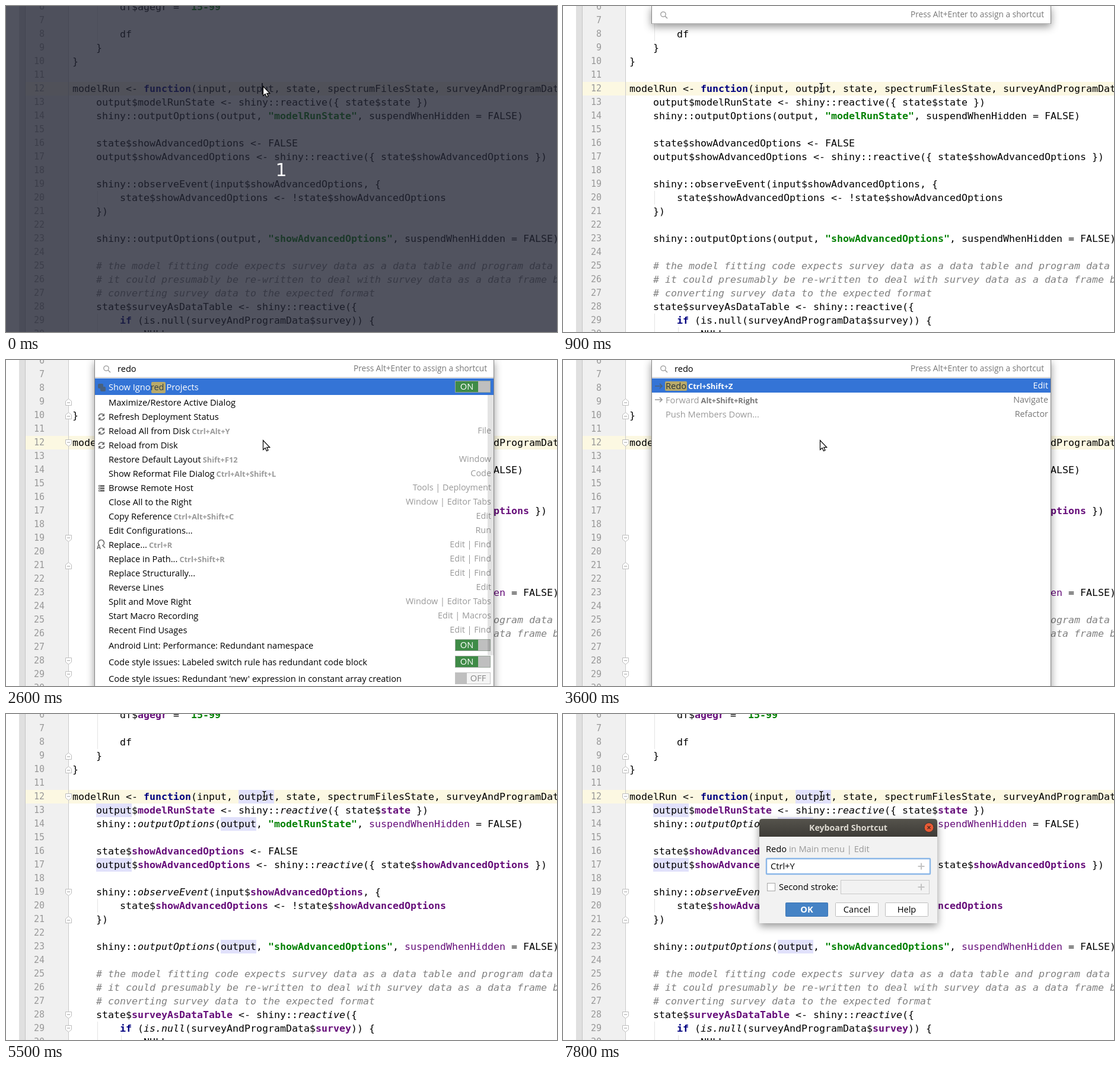
Animation of 929x550 px, one loop 8000 ms. Source, as an HTML page:

```html
<!DOCTYPE html>
<html lang="en">
<head>
<meta charset="utf-8">
<title>Assigning a shortcut</title>
<style>
html, body { margin: 0; width: 929px; height: 550px; overflow: hidden; background: #fff; }
svg { display: block; }
text { white-space: pre; font: 14.65px "Open Sans", "Noto Sans", sans-serif; }
.code text { font: 16.61px "DejaVu Sans Mono", monospace; }
.code .number { font-size: 15px; fill: #999; text-anchor: end; }
.keyword { fill: #000080; font-weight: bold; }
.string { fill: #008000; font-weight: bold; }
.comment { fill: #808080; font-style: italic; }
.semantic .field { fill: #660e7a; font-weight: bold; }
.semantic .call { font-style: italic; }
.semantic .arg { fill: #660e7a; }
.uses { fill: #e1e1fb; }
.keys { font-size: 12.8px; font-weight: bold; fill: #999; }
.place { font-size: 14.4px; fill: #999; text-anchor: end; }
.middle { text-anchor: middle; }
.icon { fill: none; stroke: #6e6e6e; stroke-width: 1.7; }
</style>
</head>
<body>
<svg id="stage" width="929" height="550" viewBox="0 0 929 550">
  <defs>
    <filter id="shadow" filterUnits="userSpaceOnUse" x="100" y="-60" width="780" height="680">
      <feDropShadow dx="0" dy="5" stdDeviation="7" flood-color="#000" flood-opacity=".42"/>
    </filter>
    <linearGradient id="titlebar" x2="0" y2="1">
      <stop stop-color="#55534c"/><stop offset="1" stop-color="#3d3b37"/>
    </linearGradient>
  </defs>
</svg>
<script>
const LOOP = 8000, FIRST_LINE = 6, LINE_HEIGHT = 23;
const stage = document.getElementById('stage');

const source = `        df$agegr = "15-99"

        df
    }
}

modelRun <- function(input, output, state, spectrumFilesState, surveyAndProgramData) {
    output$modelRunState <- shiny::reactive({ state$state })
    shiny::outputOptions(output, "modelRunState", suspendWhenHidden = FALSE)

    state$showAdvancedOptions <- FALSE
    output$showAdvancedOptions <- shiny::reactive({ state$showAdvancedOptions })

    shiny::observeEvent(input$showAdvancedOptions, {
        state$showAdvancedOptions <- !state$showAdvancedOptions
    })

    shiny::outputOptions(output, "showAdvancedOptions", suspendWhenHidden = FALSE)

    # the model fitting code expects survey data as a data table and program data
    # it could presumably be re-written to deal with survey data as a data frame by
    # converting survey data to the expected format
    state$surveyAsDataTable <- shiny::reactive({
        if (is.null(surveyAndProgramData$survey)) {
            NULL`.split('\n');

const rect = (x, y, w, h, fill, extra = '') =>
  `<rect x="${x}" y="${y}" width="${w}" height="${h}" fill="${fill}" ${extra}/>`;
const text = (x, y, content, extra = '') => `<text x="${x}" y="${y}" ${extra}>${content}</text>`;
const path = (d, extra = '') => `<path d="${d}" ${extra}/>`;
const group = (id, content, extra = '') => `<g id="${id}" ${extra}>${content}</g>`;
const lineTop = n => 128 + (n - 12) * LINE_HEIGHT;

const TOKEN = /(?<comment>#.*)|(?<string>"[^"]*")|\b(?<keyword>function|if)\b|(?<=\$)(?<field>\w+)|(?<call>(?<=::)\w+|is\.null)|(?<arg>suspendWhenHidden)/g;
const colour = line => line.replace(/</g, '&lt;').replace(TOKEN, (match, ...rest) => {
  const groups = rest[rest.length - 1];
  const kind = Object.keys(groups).find(key => groups[key]);
  return `<tspan class="${kind}">${match}</tspan>`;
});

function editor() {
  const guide = (x, y, h) => rect(x, y, 1, h, '#e3e3e3');
  const use = ([line, column]) => rect(112 + column * 10, lineTop(line), 60, LINE_HEIGHT, 'inherit').replace('fill="inherit"', '');
  const lines = source.map((line, i) => {
    const n = FIRST_LINE + i, y = lineTop(n) + 17;
    return text(65, y - 1, n, 'class="number"') + text(112, y, colour(line));
  }).join('');
  const fold = (n, opens) => `<g transform="translate(105.5 ${lineTop(n) + 12}) scale(1 ${opens ? 1 : -1})">`
    + path('M-5-5.5H5V1.5L0 5.5-5 1.5Z', 'fill="#fff" stroke="#bdbdbd"')
    + path('M-2.5-1H2.5', 'stroke="#9a9a9a"') + '</g>';
  return rect(0, 0, 929, 550, '#fff')
    + rect(22, 0, 10, 550, '#e0e0e0') + rect(32, 0, 1, 550, '#c4c4c4')
    + rect(33, 0, 72, 550, '#f0f0f0') + rect(33, 128, 896, 23, '#fcf8e2')
    + rect(105, 0, 1, 550, '#cbcbcb')
    + guide(154, 0, 59) + guide(154, 312, 23) + guide(154, 519, 31) + guide(194, 542, 8)
    + group('uses', [[12, 28], [13, 4], [14, 25], [17, 4], [23, 25]].map(use).join(''), 'class="uses"')
    + group('code', lines, 'class="code"')
    + group('folds', [9, 10, 21].map(n => fold(n, false)).join('')
        + [12, 19, 28, 29].map(n => fold(n, true)).join(''))
    + group('editorCaret', rect(431, 130, 2, 19, '#000'));
}

const reload = y => path(`M156 ${y - 1}A5 5 0 0 1 165 ${y - 3}M166 ${y + 1}A5 5 0 0 1 157 ${y + 3}`, 'class="icon"')
  + path(`M166 ${y - 6}v5h-5zM156 ${y + 6}v-5h5z`, 'fill="#6e6e6e"');
const server = y => [-5, -1, 3].map(d => rect(156, y + d, 10, 3, '#6e6e6e') + rect(157, y + d + 1, 2, 1, '#fff')).join('');
const replaceIcon = y => path(`M156 ${y - 1}A5 5 0 1 1 163 ${y + 1}L167 ${y + 5}`, 'class="icon"')
  + text(153, y + 7, 'A', 'style="font-size:10px;font-weight:bold" fill="#6e6e6e"');
const arrow = (y, stroke) => path(`M155 ${y}H167M163 ${y - 4}L167 ${y}L163 ${y + 4}`, `class="icon" style="stroke:${stroke}"`);

function toggle(y, on) {
  const frame = rect(757.5, y - 9.5, 59, 19, on ? '#3f8b47' : '#f4f4f4', `stroke="${on ? '#9aa79b' : '#c4c4c4'}"`);
  return frame + rect(on ? 796 : 758, y - 9, on ? 20 : 19, 18, '#bfbfbf')
    + text(on ? 777 : 796, y + 5, on ? 'ON' : 'OFF', `class="middle" fill="${on ? '#fff' : '#888'}"`);
}

function row(y, [title, keys = '', place = '', icon]) {
  return (icon ? icon(y) : '')
    + text(173, y + 5, title + (keys && `<tspan class="keys" dx="3">${keys}</tspan>`))
    + text(818, y + 4, place, 'class="place"');
}

function results() {
  const rows = [
    ['Maximize/Restore Active Dialog'],
    ['Refresh Deployment Status', '', '', reload],
    ['Reload All from Disk', 'Ctrl+Alt+Y', 'File', reload],
    ['Reload from Disk', '', '', reload],
    ['Restore Default Layout', 'Shift+F12', 'Window'],
    ['Show Reformat File Dialog', 'Ctrl+Alt+Shift+L', 'Code'],
    ['Browse Remote Host', '', 'Tools | Deployment', server],
    ['Close All to the Right', '', 'Window | Editor Tabs'],
    ['Copy Reference', 'Ctrl+Alt+Shift+C', 'Edit'],
    ['Edit Configurations...', '', 'Run'],
    ['Replace...', 'Ctrl+R', 'Edit | Find', replaceIcon],
    ['Replace in Path...', 'Ctrl+Shift+R', 'Edit | Find'],
    ['Replace Structurally...', '', 'Edit | Find'],
    ['Reverse Lines', '', 'Edit'],
    ['Split and Move Right', '', 'Window | Editor Tabs'],
    ['Start Macro Recording', '', 'Edit | Macros'],
    ['Recent Find Usages', '', 'Edit | Find'],
  ];
  const options = [
    ['Android Lint: Performance: Redundant namespace', true],
    ['Code style issues: Labeled switch rule has redundant code block', true],
    ["Code style issues: Redundant 'new' expression in constant array creation", false],
  ];
  return rect(150, 31, 672, 28, '#3474d6')
    + rect(155, 40, 9, 8, '#48617f', 'rx="2"') + rect(159, 45, 9, 8, '#48617f', 'rx="2"')
    + rect(245, 37, 24, 19, '#b9aa69', 'rx="2"')
    + text(173, 51, 'Show Igno<tspan fill="#33404c">red</tspan> Projects', 'fill="#fff"')
    + toggle(45, true)
    + rows.map((r, i) => row(72 + i * 24, r)).join('')
    + options.map(([title, on], i) => row(482 + i * 28, [title]) + toggle(481 + i * 28, on)).join('')
    + rect(812, 59, 10, 439, '#000', 'opacity=".11"');
}

function redoResults() {
  return rect(150, 31, 672, 24, '#3474d6') + arrow(44, '#49627f')
    + rect(172, 36, 37, 16, '#b9aa69', 'rx="2"')
    + text(173, 49, '<tspan fill="#26313a">Redo</tspan><tspan class="keys" dx="3" style="fill:#fff">Ctrl+Shift+Z</tspan>')
    + text(818, 48, 'Edit', 'class="place" style="fill:#fff"')
    + arrow(67, '#999')
    + text(173, 73, 'Forward<tspan class="keys" dx="3" style="fill:#777">Alt+Shift+Right</tspan>', 'fill="#999"')
    + text(818, 72, 'Navigate', 'class="place" style="fill:#777"')
    + text(173, 97, 'Push Members Down...', 'fill="#999"')
    + text(818, 96, 'Refactor', 'class="place" style="fill:#777"');
}

function popup() {
  return rect(149.5, -0.5, 673, 30, '#fff', 'id="panel" stroke="#858585" filter="url(#shadow)"')
    + rect(150, 29, 672, 1, '#b9b9b9')
    + group('searchBar', '<circle cx="169" cy="14" r="4.2" fill="none" stroke="#999" stroke-width="1.3"/>'
        + path('M172 17L176 21', 'stroke="#999" stroke-width="1.4"')
        + text(811, 19, 'Press Alt+Enter to assign a shortcut', 'style="font-size:13.7px" text-anchor="end" fill="#777"'))
    + text(188, 20, '', 'id="query"')
    + rect(220, 6, 1, 18, '#000', 'id="searchCaret"')
    + group('searching', text(486, 240, 'Searching...', 'class="middle" fill="#999"'))
    + group('results', results()) + group('redoResults', redoResults());
}

function dialog() {
  const plus = y => path(`M598.5 ${y}H609.5M604 ${y - 5.5}V${y + 5.5}`, 'stroke="#c3c3c3" stroke-width="2"');
  const button = (x, label) => rect(x + .5, 318.5, 72, 23, '#fff', 'stroke="#bdbdbd" rx="1"')
    + text(x + 36.5, 335, label, 'class="middle"');
  return path('M331 353V182q0-5 5-5H626q5 0 5 5V353Z', 'fill="#f2f2f2" filter="url(#shadow)"')
    + path('M331 207V182q0-5 5-5H626q5 0 5 5V207Z', 'fill="url(#titlebar)"')
    + text(481, 197, 'Keyboard Shortcut', 'class="middle" style="font-size:14.2px;font-weight:bold" fill="#dfdbd2"')
    + '<circle cx="617" cy="191.5" r="8" fill="#e75a35" stroke="#35332f"/>'
    + path('M614.5 189L619.5 194M619.5 189L614.5 194', 'stroke="#4a2a20" stroke-width="1.4"')
    + text(342, 233, 'Redo <tspan fill="#999">in Main menu | Edit</tspan>')
    + rect(343, 244, 276, 26, '#fff', 'stroke="#8bb7e8" stroke-width="2.4" rx="1"')
    + text(350, 262, '', 'id="shortcut"') + plus(257)
    + rect(344.5, 285.5, 13, 13, '#fff', 'stroke="#a8a8a8"')
    + text(364, 297, 'Second stroke:')
    + rect(468.5, 280.5, 149, 23, '#f2f2f2', 'stroke="#c9c9c9"') + plus(292)
    + rect(375.5, 318.5, 71, 23, '#4583c5', 'stroke="#3b75b4" rx="1"')
    + text(411, 335, 'OK', 'class="middle" fill="#fff" font-weight="bold" style="font-weight:bold"')
    + button(459, 'Cancel') + button(543, 'Help');
}

function pointers() {
  const beam = 'M432.5 130.5Q435.5 130.5 435.5 132.5Q435.5 130.5 438.5 130.5M435.5 132V144M432.5 145.5Q435.5 145.5 435.5 143.5Q435.5 145.5 438.5 145.5M433.5 138.5H437.5';
  return group('beam', path(beam, 'fill="none" stroke="#fff" stroke-width="3"') + path(beam, 'fill="none" stroke="#000" stroke-width="1.4"'))
    + group('countdown', rect(0, 0, 929, 550, '#232634', 'opacity=".79"')
        + text(464, 287, '1', 'class="middle" fill="#fff" style="font:30px \'DejaVu Sans\',sans-serif"'))
    + group('arrow', path('M433.5 135.5V151.5L437 148.3L439.5 153.5L442 152.3L439.7 147.3H444.7Z', 'fill="#fff" stroke="#000" stroke-width="1.2"'));
}

stage.insertAdjacentHTML('beforeend', editor() + group('popup', popup()) + group('dialog', dialog()) + pointers());

const byId = id => document.getElementById(id);
const show = (id, visible) => { byId(id).style.display = visible ? '' : 'none'; };
const setText = (id, value) => { if (byId(id).textContent !== value) byId(id).textContent = value; };

const keyTimes = [1500, 1800, 1900, 2100];
const caretStops = [188, 194, 203, 212, 220];
const caretSpans = [[1000, 2600], [3100, 3600], [4200, 4600], [5100, 5500]];

function render(t) {
  const within = (from, to) => t >= from && t < to;
  const typed = keyTimes.filter(time => t >= time).length;
  const overPopup = within(1500, 5500);

  show('countdown', t < 100);
  show('editorCaret', t < 400);
  show('arrow', t < 100 || overPopup);
  show('beam', t >= 100 && !overPopup);
  show('folds', t >= 2300);
  show('uses', t >= 2400);
  byId('code').setAttribute('class', t >= 2400 ? 'code semantic' : 'code');

  show('popup', within(700, 5500));
  byId('panel').setAttribute('height', t < 1500 ? 30 : 570);
  show('searchBar', t >= 900);
  setText('query', 'redo'.slice(0, typed));
  byId('searchCaret').setAttribute('x', caretStops[typed]);
  show('searchCaret', caretSpans.some(([from, to]) => within(from, to)));
  show('searching', within(1600, 2000));
  show('results', within(2000, 3100));
  show('redoResults', t >= 3100);

  show('dialog', t >= 5900);
  setText('shortcut', t < 6000 ? '' : t < 7800 ? 'Alt+Enter' : 'Ctrl+Y');
}

const start = performance.now();
function tick() {
  render((performance.now() - start) % LOOP);
  requestAnimationFrame(tick);
}
tick();
</script>
</body>
</html>
```
